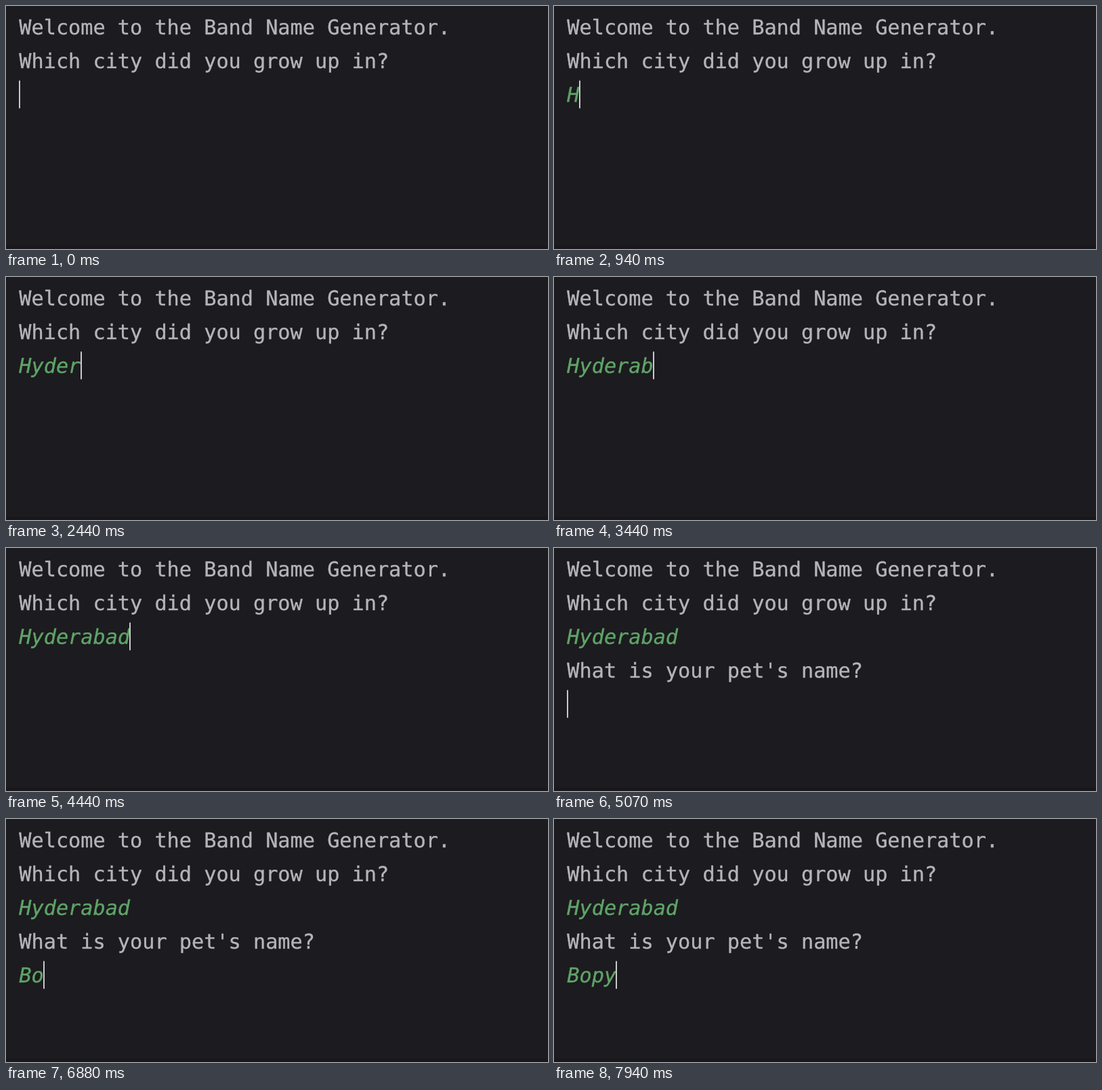
Recreate the animation shown at these times as an HTML page. Size 800x360 px, loop 8000 ms.

```html
<!DOCTYPE html>
<html lang="en">
<head>
<meta charset="utf-8">
<title>Band Name Generator</title>
<style>
  html, body { margin: 0; width: 100%; height: 100%; overflow: hidden; background: #1c1b1f; }
  svg { display: block; width: 800px; height: 360px; }
  text {
    font: 30.22px "DejaVu Sans Mono", "Noto Sans Mono", monospace;
    text-rendering: geometricPrecision;
    white-space: pre;
    fill: #b5b5b9;
    stroke: #b5b5b9;
    stroke-width: 0.35px;
  }
  .input { font-style: italic; fill: #5fa468; stroke: #5fa468; }
</style>
</head>
<body>
<svg viewBox="0 0 800 360">
  <rect width="800" height="360" fill="#1c1b1f"/>
  <rect y="355" width="800" height="5" fill="#19171b"/>
  <text x="19.3" y="41.7">Welcome to the Band Name Generator.</text>
  <text x="19.3" y="91.7">Which city did you grow up in?</text>
  <text x="19.3" y="141.7" class="input" id="city"></text>
  <text x="19.3" y="191.7" id="prompt"></text>
  <text x="19.3" y="241.7" class="input" id="pet"></text>
  <rect id="caret" width="2" height="41" fill="#c9c9cd"/>
</svg>
<script>
const LOOP = 8000, BLINK = 500, CELL = 18.19, LINE = 50;
const ENTER = 4600, ASK = 4940;
const city = { word: "Hyderabad", keys: [630, 1130, 1690, 2050, 2390, 2760, 3120, 3560, 4000] };
const pet = { word: "Bopy", keys: [5750, 6560, 7150, 7600] };
// The caret's blink restarts at each of these moments.
const resets = [-120, ...city.keys, ENTER, ASK, ...pet.keys];

const el = id => document.getElementById(id);
const caret = el("caret");

function setText(id, value) {
  const node = el(id);
  if (node.textContent !== value) node.textContent = value;
}

function typed({ word, keys }, t) {
  return word.slice(0, keys.filter(k => k <= t).length);
}

function draw(t) {
  const cityText = typed(city, t), petText = typed(pet, t);
  setText("city", cityText);
  setText("prompt", t >= ASK ? "What is your pet's name?" : "");
  setText("pet", petText);

  const row = t < ENTER ? 2 : t < ASK ? 3 : 4;
  const col = row === 2 ? cityText.length : petText.length;
  const idle = t - resets.filter(r => r <= t).pop();
  caret.setAttribute("x", Math.round(18.7 + col * CELL));
  caret.setAttribute("y", 10.5 + row * LINE);
  caret.setAttribute("visibility", idle % (2 * BLINK) < BLINK ? "visible" : "hidden");
}

const start = performance.now();
function tick() {
  draw((performance.now() - start) % LOOP);
  requestAnimationFrame(tick);
}
tick();
</script>
</body>
</html>
```
